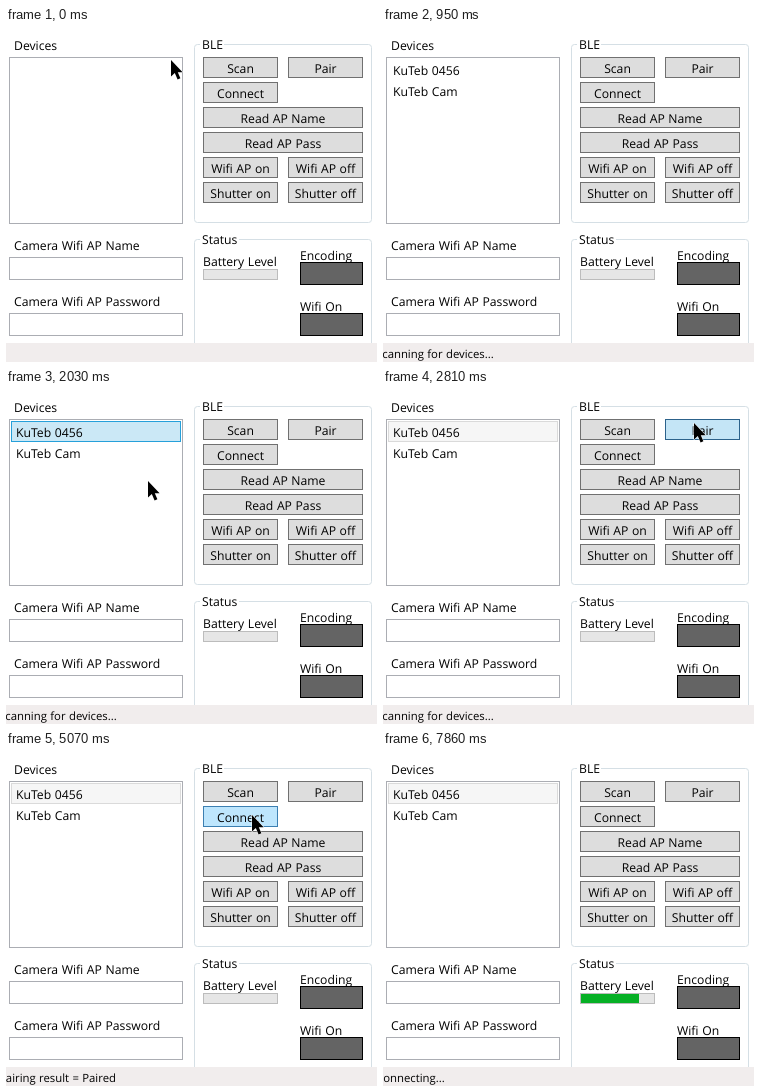
These frames come from a looping animation (371x334 px, 8 s). An HTML page:

```html
<!DOCTYPE html>
<html lang="en">
<head>
<meta charset="utf-8">
<title>Camera BLE panel</title>
<style>
html, body { margin: 0; width: 100%; height: 100%; overflow: hidden; background: #fff; }
svg { display: block; width: 371px; height: 334px; }
text { font: 12.2px "Open Sans", "Noto Sans", sans-serif; word-spacing: .4px; fill: #000; white-space: pre; text-rendering: geometricPrecision; }
#status { font-size: 11.35px; }
</style>
</head>
<body>
<svg id="stage" viewBox="0 0 371 334"></svg>
<script>
const LOOP = 8000;
const STEP = 80;
const stage = document.getElementById('stage');

function add(tag, attrs, content) {
  const el = document.createElementNS('http://www.w3.org/2000/svg', tag);
  for (const key in attrs) el.setAttribute(key, attrs[key]);
  if (content) el.textContent = content;
  return stage.appendChild(el);
}
// Box with a 1px border inside its outer size
function box(x, y, width, height, fill, stroke, rx = 0) {
  return add('rect', { x: x + .5, y: y + .5, width: width - 1, height: height - 1, fill, stroke, rx });
}
const label = (x, y, content, attrs) => add('text', { x, y, ...attrs }, content);
const show = (el, on) => el.setAttribute('visibility', on ? 'visible' : 'hidden');
const paint = (el, [fill, stroke]) => {
  el.setAttribute('fill', fill);
  el.setAttribute('stroke', stroke);
};

function field(y, height, title) {
  label(8, y - 7, title);
  box(3, y, 174, height, '#fff', '#abadb3');
}
function group(y, height, title, gap) {
  box(188, y, 178, height, 'none', '#d5dfe5', 3);
  add('rect', { x: 194, y: y - 2, width: gap, height: 5, fill: '#fff' });
  label(196, y + 5, title);
}
function lamp(y, title) {
  label(294, y - 2, title);
  box(294, y, 63, 23, '#646464', '#000');
}

field(29, 167, 'Devices');
field(229, 23, 'Camera Wifi AP Name');
field(285, 23, 'Camera Wifi AP Password');
group(16, 179, 'BLE', 24);
group(211, 119, 'Status', 39);

const item = box(5, 31, 170, 22, 'none', 'none');
item.setAttribute('height', 20);
const devices = ['KuTeb 0456', 'KuTeb Cam'].map((name, i) => label(10, 47 + 21 * i, name));

const rows = [
  ['Scan', 'Pair'], ['Connect'], ['Read AP Name'], ['Read AP Pass'],
  ['Wifi AP on', 'Wifi AP off'], ['Shutter on', 'Shutter off']
];
const buttons = rows.flatMap((names, row) => names.map((name, col) => {
  const x = 197 + 85 * col;
  const y = 29 + 25 * row;
  const width = name.startsWith('Read') ? 160 : 75;
  const face = box(x, y, width, 21, '#ddd', '#707070');
  label(x + width / 2, y + 16, name, { 'text-anchor': 'middle' });
  return { name, x, y, width, face };
}));

label(197, 238, 'Battery Level');
box(197, 241, 75, 11, '#e6e6e6', '#bcbcbc');
const battery = add('rect', { x: 198, y: 242, width: 58, height: 9, fill: '#06b025' });
lamp(234, 'Encoding');
lamp(285, 'Wifi On');

add('rect', { x: 0, y: 315, width: 371, height: 19, fill: '#f1eded' });
const status = label(-7, 330, '', { id: 'status' });
const cursor = add('path', {
  d: 'M0 0V16.5L3.8 13L6.6 19.5L9.4 18.2L6.8 12.2H11.6Z',
  stroke: '#fff', 'stroke-width': 1, 'paint-order': 'stroke'
});

const BUTTON = { normal: ['#ddd', '#707070'], hover: ['#bee6fd', '#3c7fb1'], pressed: ['#c4e5f6', '#2c628b'] };
const ITEM = {
  none: ['none', 'none'], hover: ['#e5f3fb', '#70c0e7'],
  active: ['#cbe8f6', '#26a0da'], inactive: ['#f6f6f6', '#dadada']
};

// Pointer moves to each place: start, duration, x, y
const moves = [
  [0, 240, 235, 36], [320, 470, 116, 277], [1100, 0, 112, 38], [1490, 0, 112, 33],
  [1810, 220, 142, 91], [2030, 460, 311, 33],
  [5070, 0, 246, 63], [5070, 160, 241, 56], [6390, 0, 235, 169]
];
const clicks = { Scan: [240, 320], Pair: [2810, 2910], Connect: [5760, 5840] };
const messages = [
  [0, ''], [320, 'Scanning for devices...'], [2910, 'Pairing...'], [3520, 'Pairing request...'],
  [4440, 'Pairing result = Paired'], [5840, 'Connecting...']
];
const itemLook = [[0, 'none'], [1100, 'hover'], [1490, 'active'], [2810, 'inactive']];

const at = (track, t) => track.findLast(([from]) => from <= t)[1];
const within = (t, from, to) => t >= from && t < to;
const ease = p => p * p * (3 - 2 * p);

function pointerAt(t) {
  let x = 165, y = 32;
  for (const [start, span, toX, toY] of moves) {
    if (t < start) break;
    const sampled = Math.floor((t - start) / STEP) * STEP;
    const p = t >= start + span ? 1 : ease(sampled / span);
    x += (toX - x) * p;
    y += (toY - y) * p;
  }
  return [Math.round(x), Math.round(y)];
}

function render(t) {
  const [x, y] = pointerAt(t);
  const shown = !within(t, 950, 1100) && t < 6460;
  show(cursor, shown);
  cursor.setAttribute('transform', `translate(${x} ${y})`);

  for (const b of buttons) {
    const over = shown && within(x, b.x, b.x + b.width) && within(y, b.y, b.y + 21);
    const pressed = b.name in clicks && within(t, ...clicks[b.name]);
    paint(b.face, BUTTON[pressed ? 'pressed' : over ? 'hover' : 'normal']);
  }
  paint(item, ITEM[at(itemLook, t)]);
  devices.forEach((el, i) => show(el, t >= 630 + 260 * i));
  show(battery, t >= 7860);
  status.textContent = at(messages, t);
}

const start = performance.now();
function tick() {
  render((performance.now() - start) % LOOP);
  requestAnimationFrame(tick);
}
tick();
</script>
</body>
</html>
```
